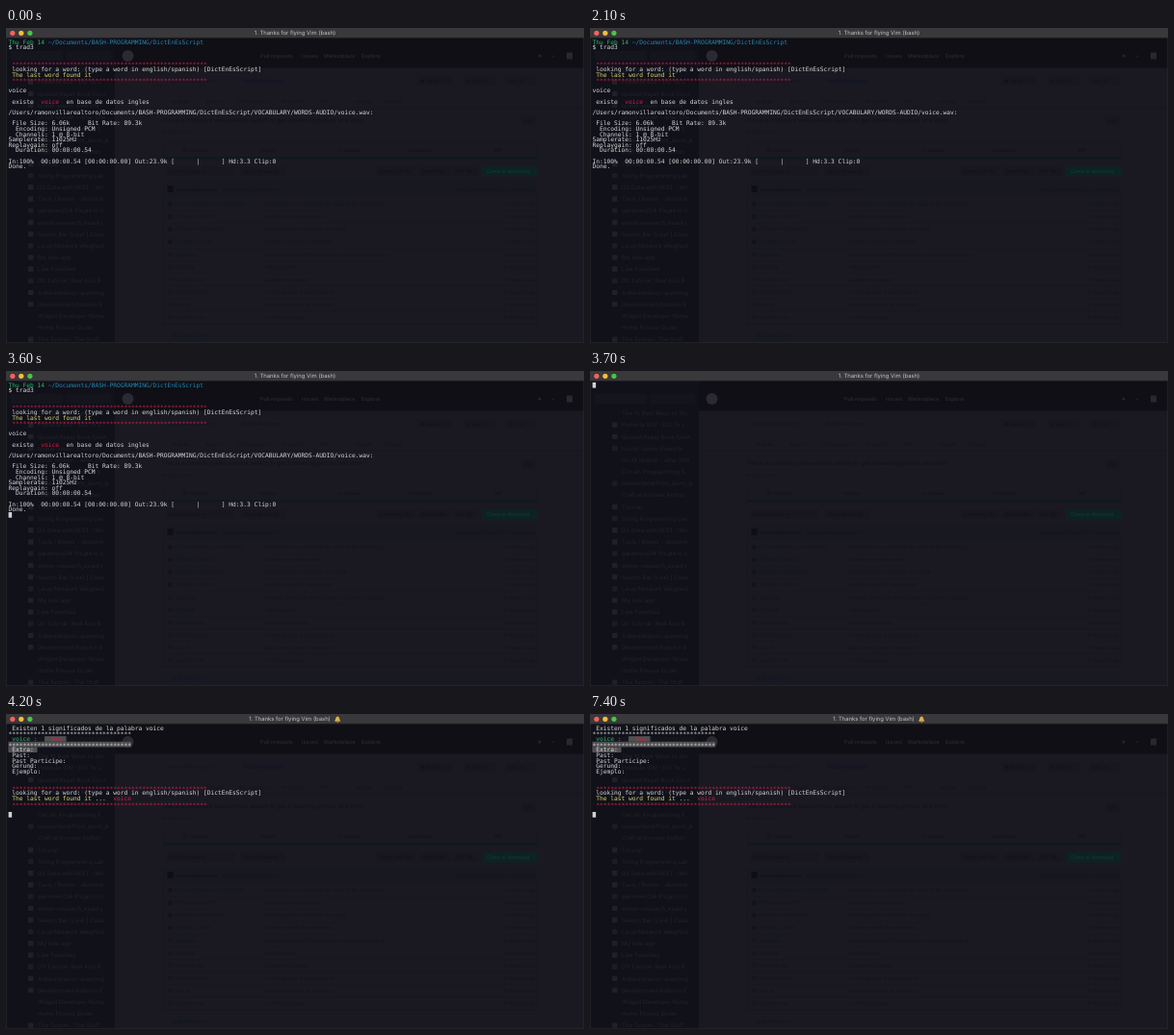
Write an HTML page that moves like this. It is 600 px wide and 328 px high and loops after 8000 ms.

```html
<!DOCTYPE html>
<html lang="en">
<head>
<meta charset="utf-8">
<title>Terminal dictionary</title>
<style>
  html, body { margin: 0; width: 100%; height: 100%; overflow: hidden; background: #1a1922; }
  svg { display: block; width: 100vw; height: 100vh; }
  text { white-space: pre; text-rendering: geometricPrecision; }
  .ui { font-family: Inter, "Open Sans", sans-serif; }
  .term { font: 6.24px "DejaVu Sans Mono", monospace; }
</style>
</head>
<body>
<svg id="stage" viewBox="0 0 600 328"></svg>
<script>
const LOOP = 8000, CLEAR = 3700, RESULT = 4100;
const CELL = 3.757, ROW = 5.63, LEFT = 2.4, TOP = 14.7;
const WHITE = '#d6d6d6', RED = '#d01f45', YELLOW = '#d9d873', GREEN = '#25b866', BLUE = '#2387b5', GREY = '#505053';
// Dimmed web page behind the terminal
const PAGE = '#1a1922', INK = '#111118', FAINT = '#14141b', LINK = '#121523', EDGE = '#17161e';
// Times at which the cursor flips, starting hidden
const BLINKS = [100, 600, 1100, 1700, 2200, 2700, 3200, 4800, 5300, 5800, 6400, 6900, 7400];

const rect = (x, y, w, h, fill, extra = '') =>
  `<rect x="${x}" y="${y}" width="${w}" height="${h}" fill="${fill}" ${extra}/>`;
const circle = (x, y, r, fill) => `<circle cx="${x}" cy="${y}" r="${r}" fill="${fill}"/>`;
const label = (x, y, str, fill = INK, size = 5, extra = '') =>
  `<text class="ui" x="${x}" y="${y + size * .36}" font-size="${size}" fill="${fill}" ${extra}>${str}</text>`;
const cells = (row, col, str, fill = WHITE, drop = 2.1) =>
  `<text class="term" x="${LEFT + col * CELL}" y="${TOP + row * ROW + drop}" fill="${fill}">${str}</text>`;
const shade = (row, col, n) =>
  rect(LEFT + col * CELL, TOP + row * ROW - 2.8, n * CELL, ROW, GREY);
const stars = (row, col, n, fill) => cells(row, col, '*'.repeat(n), fill, 3.1);
const rule = row => stars(row, 1, 54, RED);
const PROMPT = 'looking for a word: (type a word in english/spanish) [DictEnEsScript]';

function sidebar() {
  const items = ['The 10 Best Ways to Stu', 'Preterite (EN - ES) To L', 'Quoted Paper Book Elect', 'tunnel-vision: Everythi',
    'UI UX Motion - After Effe', 'Circuit: Programming S', 'mastermind/Print_zoom_b', 'Craft and router Author', 'Tutorial',
    'String Programming Lan', 'D3 Data with REST - Wh', 'Tools / Bonus - sketchin', 'gardener/D4-Plugin in U', 'winter-research_beauty',
    'Search Bar (Live) | Class', 'Linux/Network Weighed', 'My rails app', 'Live Favorites', 'D3 Tutorial: Real Axis B',
    'Administration spanning', 'Development/Autorun E', 'Widget Developer Notes', 'Home Fitness Guide', 'The Tunnel - The Stuff'];
  const bare = [0, 4, 5, 7, 21, 22];
  return rect(0, 10, 113, 318, '#11111a') + rect(5, 24, 54, 10, '#15151e', 'rx="1"') + rect(62, 24, 47, 10, '#14141d', 'rx="1"') +
    items.map((s, i) => {
      const y = 44 + i * 12.18;
      return (bare.includes(i) ? '' : rect(23, y - 2.7, 5.4, 5.4, i % 3 ? '#20202a' : '#1c1c28', 'rx="1"')) +
        label(33, y, s, '#23232d', 6);
    }).join('');
}

function repoPage() {
  const line = (y, x = 163, w = 389) => rect(x, y, w, .6, EDGE);
  const button = (x, y, w, s) => rect(x, y - 4.5, w, 9.5, '#18171f', 'rx="1"') + label(x + 3, y, s, INK, 4.6);
  const files = [
    ['EXTRA-VOCABULARY/WORDS', 'Add words and sounds to the base of the dictionary', 3],
    ['INSTALL/SCRIPTS', 'Update the install scripts', 3],
    ['VOCABULARY/AUDIO', 'Add sound for new words in english', 3],
    ['TRANSLATIONS', 'Update the list of translations', 3],
    ['.gitignore', 'Add the first list of files to leave out of the repository', 8],
    ['LICENSE', 'Initial commit', 8],
    ['README.md', 'Update the readme', 8],
    ['DictEnEsScript', 'Fix the search of the last word', 5],
    ['trad.sh', 'Add a new option to the menu', 5],
    ['requirements', 'List the packages', 5]];
  let s = rect(113, 10, 487, 31.5, '#0f0f15') + circle(126.5, 29, 6, '#2a2a32');
  [[264, 'Pull requests'], [307, 'Issues'], [330, 'Marketplace'], [369, 'Explore']]
    .forEach(([x, t]) => s += label(x, 29, t, '#28282f', 5.4, 'font-weight="600"'));
  s += circle(554, 29, 1.6, '#25252c') + label(566, 29, '+', '#25252c', 6) + rect(582, 25.5, 6, 7, '#28282f');
  s += label(168, 55, 'ramonvillarealtoro / ', LINK, 5.8) + label(245, 55, 'DictEnEsScript', LINK, 5.8, 'font-weight="700"');
  s += button(427, 55, 37, '● Watch  1') + button(475, 55, 34, '★ Star  0') + button(518, 55, 33, 'Fork  0');
  s += line(82.5, 113, 487) + rect(163, 67, 35, 1, '#1e171c');
  [[173, '‹› Code'], [207, 'Issues 0'], [241, 'Pull requests 0'], [287, 'Projects 0'], [325, 'Wiki'], [362, 'Insights'], [393, 'Settings']]
    .forEach(([x, t], i) => s += label(x, 76, t, i ? FAINT : INK, 4.7));
  s += label(162, 96, 'This is a console x web-service search to get a meaning picture and story', INK, 6);
  s += button(535, 97, 16, 'Edit') + label(162, 108, 'Manage topics', LINK, 4.5);
  s += rect(163, 120, 388, 17, 'none', `stroke="${EDGE}" stroke-width=".6"`);
  [[183, '45 commits'], [262, '1 branch'], [345, '0 releases'], [414, '1 contributor'], [507, 'MIT']]
    .forEach(([x, t]) => s += label(x, 127, t, INK, 4.8));
  s += rect(163, 134, 388, 2.2, '#101a1b');
  s += button(166, 149, 72, 'Branch: master ▾') + button(243, 149, 47, 'New pull request');
  s += button(384, 149, 42, 'Create new file') + button(428, 149, 35, 'Upload files') + button(464, 149, 27, 'Find file');
  s += rect(494.5, 144.3, 56.5, 10.2, '#0b2423', 'rx="1.5"') + label(499, 149.4, 'Clone or download', '#1b3a38', 5);
  s += rect(163, 160, 388, 15, '#181822') + rect(167.5, 164, 6, 7, '#0e0e14') +
    label(177, 168, 'ramonvillarealtoro', INK, 4.8, 'font-weight="600"') + label(225, 168, 'Update the vocabulary list', FAINT, 4.8) +
    label(549, 168, 'Latest commit 5c1e02a 3 months ago', FAINT, 4.8, 'text-anchor="end"');
  files.forEach(([name, msg, age], i) => {
    const y = 183.5 + i * 13.05;
    s += line(y + 6.5) + rect(168, y - 2, 5, 4.2, i < 4 ? '#11131d' : EDGE) +
      label(175, y, name, LINK, 5) + label(269, y, msg, FAINT, 5) +
      label(549, y, age + ' months ago', FAINT, 5, 'text-anchor="end"');
  });
  return s + rect(163, 175, 388, 133, 'none', `stroke="${EDGE}" stroke-width=".6"`) +
    rect(163, 315, 388, 13, '#191922') + label(172, 320.5, '▤ README.md', LINK, 5);
}

function titleBar() {
  const bell = `<g id="bell"><path d="M341 7.8C342.3 6.6 341.7 2.7 344.2 2.5C346.7 2.7 346.1 6.6 347.4 7.8Z" fill="#dcb04a"/>` +
    circle(344.2, 8.2, .9, '#a87c2a') + '</g>';
  return rect(0, 0, 600, 10.2, '#39383b') +
    circle(6.8, 5.3, 2.6, '#f8615a') + circle(15.8, 5.3, 2.6, '#f6bd3b') + circle(24.9, 5.3, 2.6, '#46c645') +
    label(300, 5.3, '1. Thanks for flying Vim (bash)', '#c4c3c6', 5.9, 'id="title" text-anchor="middle"') + bell;
}

function soundScreen() {
  const info = [' File Size: 6.06k     Bit Rate: 89.3k', '  Encoding: Unsigned PCM', '  Channels: 1 @ 8-bit',
    'Samplerate: 11025Hz', 'Replaygain: off', '  Duration: 00:00:00.54', '',
    'In:100%  00:00:00.54 [00:00:00.00] Out:23.9k [      |      ] Hd:3.3 Clip:0', 'Done.'];
  return cells(0, 0, 'Thu Feb 14', GREEN) + cells(0, 11, '~/Documents/BASH-PROGRAMMING/DictEnEsScript', BLUE) +
    cells(1, 0, '$ trad3') + rule(4) + cells(5, 1, PROMPT) + cells(6, 1, 'The last word found it', YELLOW) + rule(7) +
    cells(9, 0, 'voice') +
    cells(11, 1, 'existe') + cells(11, 9, 'voice', RED) + cells(11, 16, 'en base de datos ingles') +
    cells(13, 0, '/Users/ramonvillarealtoro/Documents/BASH-PROGRAMMING/DictEnEsScript/VOCABULARY/WORDS-AUDIO/voice.wav:') +
    info.map((s, i) => cells(15 + i, 0, s)).join('');
}

function resultScreen() {
  const fields = ['Extra:', 'Past:', 'Past Participe:', 'Gerund:', 'Ejemplo:'];
  return cells(0, 1, 'Existen 1 significados de la palabra voice') + stars(1, 0, 34) +
    cells(2, 1, 'voice', GREEN) + cells(2, 7, ':', '#77777a') + shade(2, 10, 6) + cells(2, 12, 'voz', RED) +
    shade(3, 0, 34) + stars(3, 0, 34) + shade(4, 0, 8) + fields.map((s, i) => cells(4 + i, 1, s)).join('') +
    rule(11) + cells(12, 1, PROMPT) +
    cells(13, 1, 'The last word found it ...', YELLOW) + cells(13, 29, 'voice', RED) + rule(14);
}

const $ = id => document.getElementById(id);
$('stage').innerHTML = rect(0, 0, 600, 328, PAGE) + sidebar() + repoPage() + titleBar() +
  rect(.25, 10, 599.5, 317.75, 'none', 'stroke="#2c2c33" stroke-width=".5"') +
  `<g id="sound">${soundScreen()}</g><g id="result">${resultScreen()}</g>` +
  rect(2.6, 0, 3.5, 5.7, '#d2d2d4', 'id="cursor"');

const show = (id, on) => $(id).setAttribute('visibility', on ? 'visible' : 'hidden');

function draw(now) {
  const t = now % LOOP;
  const done = t >= RESULT;
  show('sound', t < CLEAR);
  show('result', done);
  show('bell', done);
  $('title').setAttribute('x', done ? 294.5 : 300);
  show('cursor', BLINKS.filter(b => b <= t).length % 2);
  const row = done ? 16 : t < CLEAR ? 24 : 0;
  $('cursor').setAttribute('y', TOP + row * ROW - 2.8);
  requestAnimationFrame(draw);
}
draw(performance.now());
</script>
</body>
</html>
```
